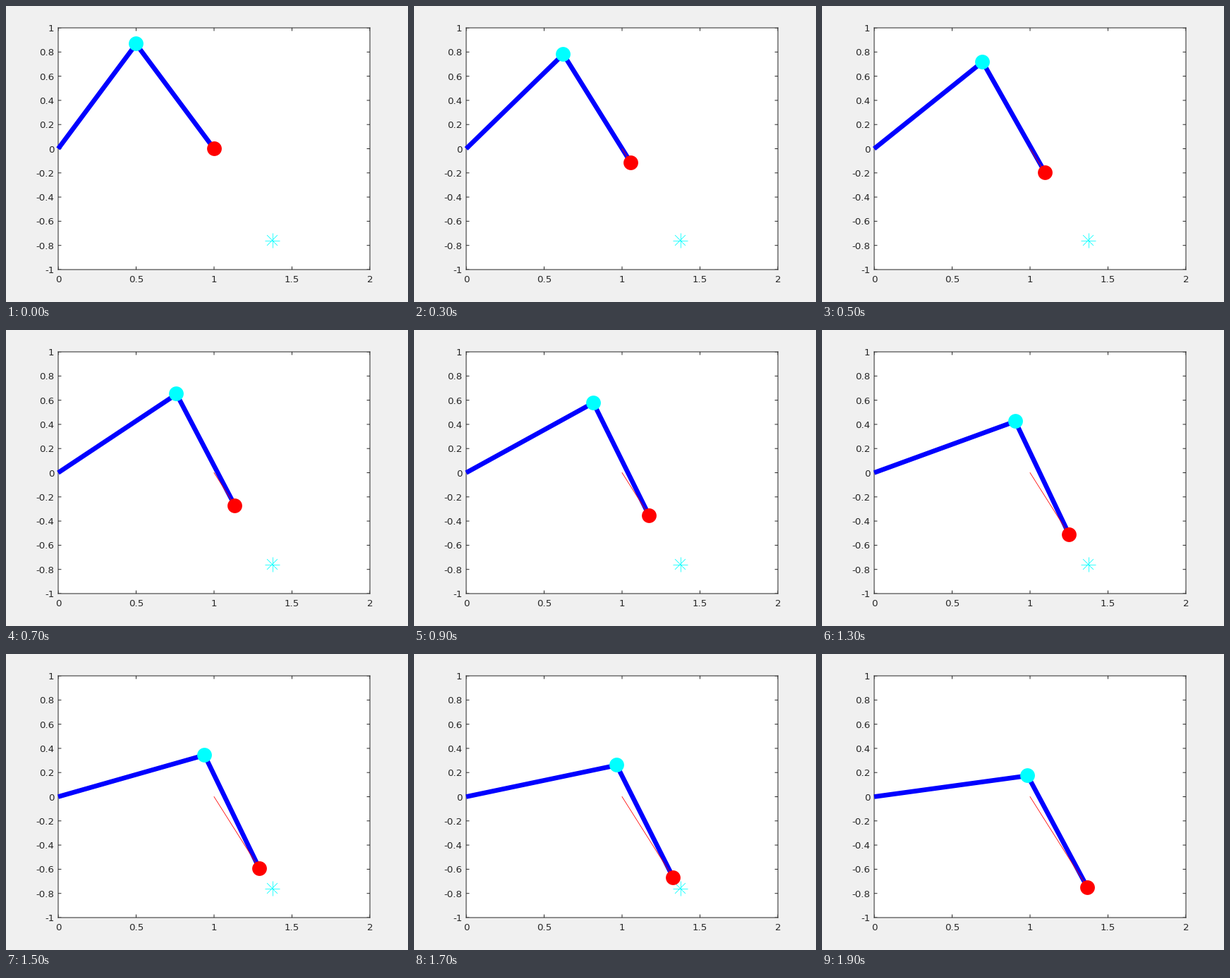
Write a matplotlib script that moves like this. It is 570 px wide and 420 px high and loops after 2 s.

```python
import numpy as np
import matplotlib.pyplot as plt
from matplotlib.animation import FuncAnimation
from matplotlib.patches import Circle
from matplotlib.transforms import IdentityTransform

W, H, DPI = 570, 420, 100
PX = 72 / DPI  # one pixel in points
FRAMES = 20
INK = "#262626"
CYAN, RED, BLUE = "#00ffff", "#ff0000", "#0000ff"

START = np.array([1.0, 0.0])
END = np.array([1.3677, -0.75])
TARGET = np.array([1.373, -0.758])

plt.rcParams.update({
    "font.family": "DejaVu Sans",
    "font.size": 13.33 * PX,
    "axes.unicode_minus": False,
    "toolbar": "None",
})

fig = plt.figure(figsize=(W / DPI, H / DPI), dpi=DPI, facecolor="#f0f0f0")
ax = fig.add_axes([74 / W, 46 / H, 442 / W, 343 / H], facecolor="white")
ax.set(xlim=(0, 2), ylim=(-1, 1))
x_ticks = np.arange(5) / 2
y_ticks = np.arange(-5, 6) / 5
ax.set_xticks(x_ticks, [f"{x:g}" for x in x_ticks])
ax.set_yticks(y_ticks, [f"{y:g}" for y in y_ticks])
ax.tick_params(length=0, labelcolor=INK)
ax.tick_params(axis="x", pad=8 * PX)
ax.tick_params(axis="y", pad=5.5 * PX)
for spine in ax.spines.values():
    spine.set(linewidth=PX, edgecolor=INK, snap=False)

# inward ticks on all four sides
dx, dy = 4.42 / 221, 4.42 / 171.5
style = dict(color=INK, lw=PX, snap=False, zorder=2)
for edge, inner in ((-1, -1 + dy), (1, 1 - dy)):
    ax.vlines(x_ticks, edge, inner, **style)
for edge, inner in ((0, dx), (2, 2 - dx)):
    ax.hlines(y_ticks, edge, inner, **style)


def pixel(point):
    """Centre of the stage pixel that holds a data point."""
    return np.floor(ax.transData.transform(point)) + 0.5


def star(point, reach):
    """Eight thin rays around a point, reach in pixels."""
    center = pixel(point)
    rays = []
    for angle in np.arange(4) * np.pi / 4:
        d = reach * np.array([np.cos(angle), np.sin(angle)])
        a, b = center - d, center + d
        rays += ax.plot([a[0], b[0]], [a[1], b[1]], color=CYAN, lw=0.8 * PX,
                        solid_capstyle="butt", zorder=3,
                        transform=IdentityTransform())
    return rays


def dot(color, zorder):
    patch = Circle((0, 0), 10.4, color=color, lw=0, zorder=zorder,
                   transform=IdentityTransform(), clip_on=False)
    return ax.add_artist(patch)


def elbow(tip):
    """Upper joint of two unit links reaching from the origin to tip."""
    x, y = tip
    angle = np.arctan2(y, x) + np.arccos(np.hypot(x, y) / 2)
    return np.array([np.cos(angle), np.sin(angle)])


goal = star(TARGET, 10.5)
arm, = ax.plot([], [], color=BLUE, lw=6.67 * PX, zorder=4,
               solid_capstyle="butt", solid_joinstyle="round", clip_on=False)
trail, = ax.plot([], [], color=RED, lw=0.8 * PX, zorder=5)
joint = dot(CYAN, 6)
hand = dot(RED, 7)
ax.set(xlim=(0, 2), ylim=(-1, 1))


def draw(i):
    tip = START + (END - START) * i / (FRAMES - 1)
    mid = elbow(tip)
    arm.set_data([0, mid[0], tip[0]], [0, mid[1], tip[1]])
    trail.set_data([START[0], tip[0]], [START[1], tip[1]])
    joint.center = pixel(mid)
    hand.center = pixel(tip)
    for ray in goal:
        ray.set_visible(i < FRAMES - 1)  # covered once the hand arrives
    return arm, trail, joint, hand, *goal


anim = FuncAnimation(fig, draw, frames=FRAMES, init_func=lambda: draw(0),
                     interval=100, repeat=True, repeat_delay=0)
plt.show()
```
